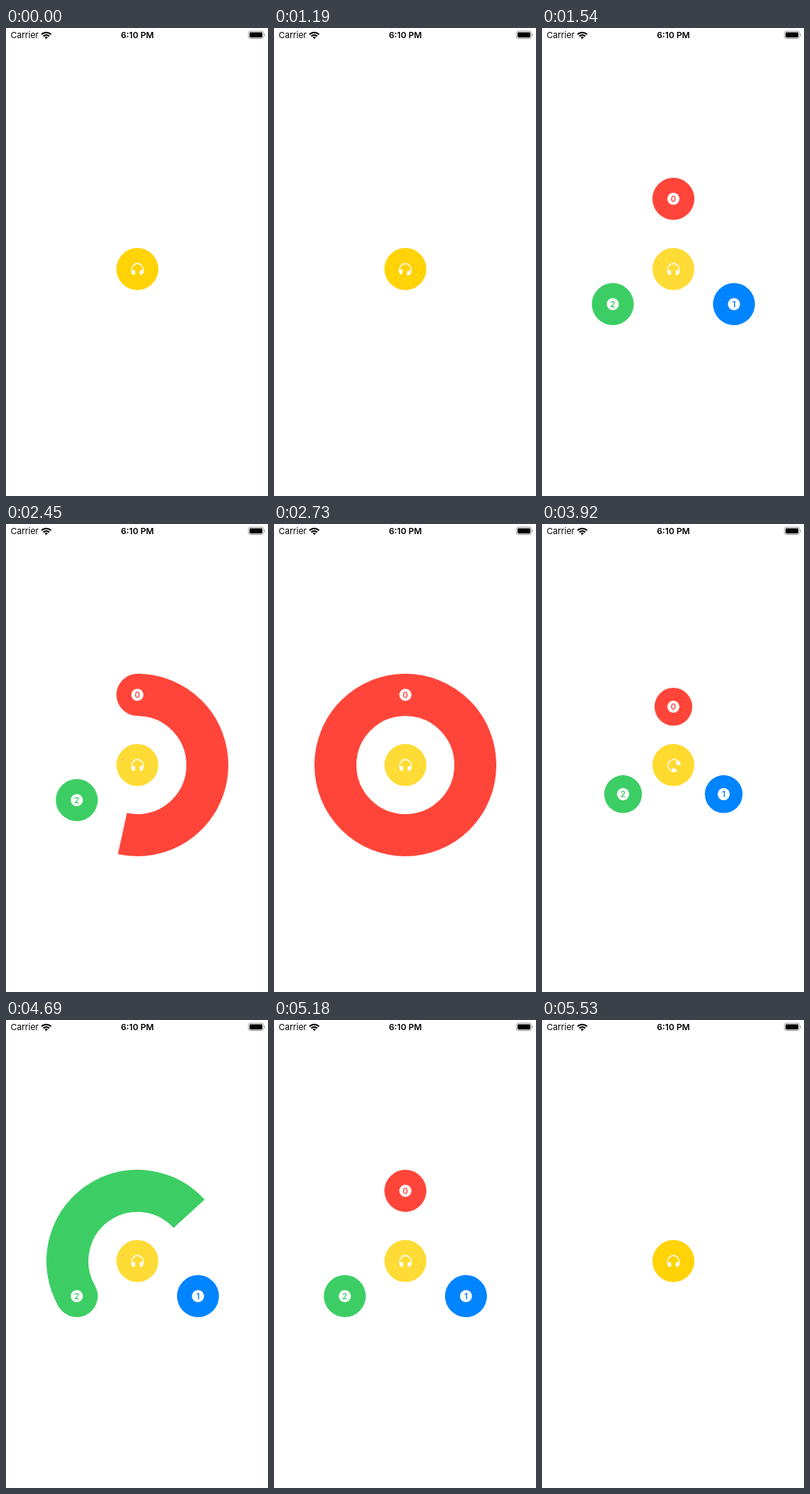
Recreate the animation shown at these times as an HTML page. Size 337x600 px, loop 5600 ms.

```html
<!DOCTYPE html>
<html lang="en">
<head>
<meta charset="utf-8">
<title>Circle menu</title>
<style>
  html, body { margin: 0; width: 100%; height: 100%; overflow: hidden; background: #fff; }
  svg { display: block; width: 337px; height: 600px; }
  text { font-family: Inter, "Liberation Sans", sans-serif; font-size: 11px; }
  .mid { text-anchor: middle; }
  .time { font-weight: 600; }
  .digit { font-size: 10.5px; font-weight: 600; }
</style>
</head>
<body>
<svg viewBox="0 0 337 600">
  <rect width="337" height="600" fill="#fff"/>

  <text x="6" y="13">Carrier</text>
  <g fill="none" stroke="#000" stroke-width="2">
    <path d="M45.7 8.2A8.7 8.7 0 0 1 57.9 8.2"/>
    <path d="M48 10.6A5.4 5.4 0 0 1 55.6 10.6"/>
  </g>
  <path d="M51.8 14.1L49.7 12A3 3 0 0 1 53.9 12Z"/>
  <text class="mid time" x="169" y="13">6:10 PM</text>
  <rect x="311.9" y="4" width="19.2" height="9.6" rx="2.6" fill="none" stroke="#000" stroke-opacity=".4" stroke-width=".9"/>
  <rect x="313.3" y="5.4" width="16.4" height="6.8" rx="1.4"/>
  <path d="M332 7.2A1.8 1.8 0 0 1 332 10.4Z" fill-opacity=".45"/>

  <g transform="translate(169 309)">
    <g id="items"></g>
    <g id="button">
      <circle r="27" fill="#ffd305"/>
      <g id="icon" fill="#fff">
        <path d="M-7.4 4V.4A7.4 7.4 0 0 1 7.4 .4V4" fill="none" stroke="#fff" stroke-width="1.3"/>
        <rect x="-6.6" y="1.2" width="3.7" height="6.4" rx="1.6"/>
        <rect x="2.9" y="1.2" width="3.7" height="6.4" rx="1.6"/>
        <path d="M-8 2.2H-6V6.4Q-8 5.6 -8 4ZM8 2.2H6V6.4Q8 5.6 8 4Z"/>
      </g>
    </g>
  </g>
</svg>
<script>
const LOOP = 5600, TICK = 70, MOVE = 350, FILL = 600, REACH = 90, SIZE = 27;
const COLORS = ["#ff4539", "#0084ff", "#3cce64"];

// Each cycle: menu opens, an item may be picked, menu closes.
const CYCLES = [
  { open: 1150, pick: 2138, item: 0, close: 2930 },
  { open: 3670, pick: 4402, item: 2, close: 5176 }
];

const byId = id => document.getElementById(id);
const layer = byId("items"), button = byId("button"), icon = byId("icon");

function add(parent, tag, attrs = {}) {
  const el = document.createElementNS("http://www.w3.org/2000/svg", tag);
  for (const k in attrs) el.setAttribute(k, attrs[k]);
  return parent.appendChild(el);
}

const angleOf = i => i * 120 - 90;

const items = COLORS.map((color, i) => {
  const group = add(layer, "g");
  const disc = add(group, "circle", { fill: color });
  add(group, "circle", { r: 7.8, fill: "#fff" });
  add(group, "text", { class: "mid digit", y: 3.8, fill: color }).textContent = i;
  return { group, disc };
});

const ring = add(layer, "circle", {
  r: REACH, fill: "none", "stroke-width": SIZE * 2, pathLength: 360
});

// cubic-bezier(.42, 0, .58, 1)
function ease(x) {
  if (x <= 0) return 0;
  if (x >= 1) return 1;
  let lo = 0, hi = 1, u = .5;
  for (let n = 0; n < 24; n++) {
    u = (lo + hi) / 2;
    const bx = 3 * u * (1 - u) * (.42 * (1 - u) + .58 * u) + u ** 3;
    if (bx < x) lo = u; else hi = u;
  }
  return u * u * (3 - 2 * u);
}

function draw(t) {
  let p = 0, active = null;
  for (const c of CYCLES) {
    p += ease((t - c.open) / MOVE) - ease((t - c.close) / MOVE);
    if (t >= c.pick && t < c.close) active = c;
  }

  items.forEach(({ group, disc }, i) => {
    const a = angleOf(i) * Math.PI / 180, d = REACH * p;
    group.setAttribute("transform", `translate(${d * Math.cos(a)} ${d * Math.sin(a)})`);
    disc.setAttribute("r", SIZE * (.4 + .6 * p));
    layer.append(group);
  });

  ring.style.display = active ? "" : "none";
  if (active) {
    const sweep = 360 * ease((t - active.pick) / FILL);
    ring.setAttribute("stroke", COLORS[active.item]);
    ring.setAttribute("transform", `rotate(${angleOf(active.item)})`);
    ring.setAttribute("stroke-dasharray", sweep < 360 ? `${sweep} 400` : "none");
    layer.append(ring, items[active.item].group);
  }

  button.setAttribute("opacity", 1 - .2 * p);
  icon.setAttribute("transform", `rotate(${360 * p})`);
}

const start = performance.now();
function frame() {
  const t = (performance.now() - start + 4) % LOOP;
  draw(Math.floor(t / TICK) * TICK);
  requestAnimationFrame(frame);
}
frame();
</script>
</body>
</html>
```
